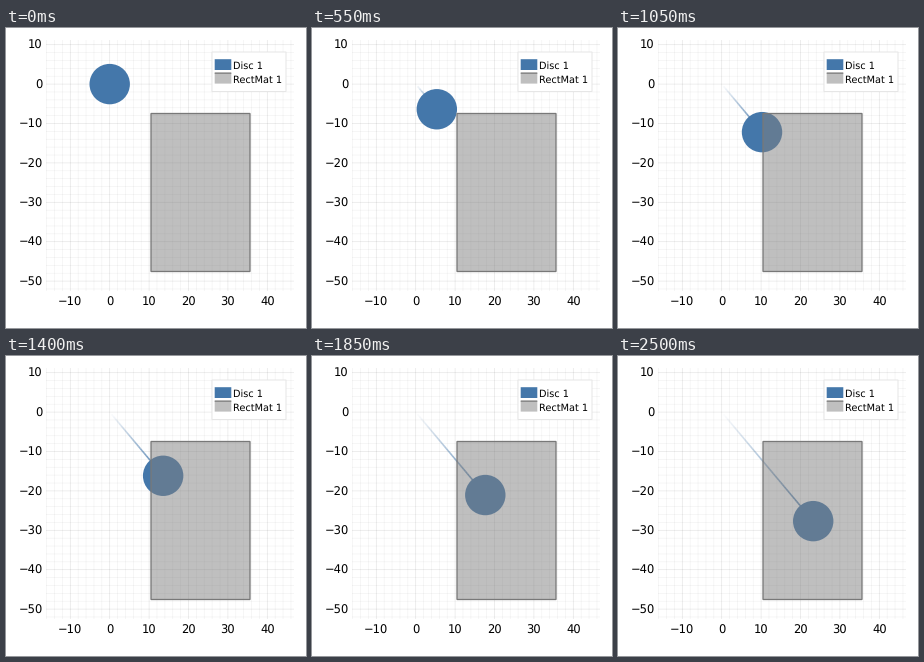
Animation of 300 by 300 pixels, one loop 2550 ms. Source, as a matplotlib script:

```python
import math

import matplotlib.pyplot as plt
import numpy as np
from matplotlib.animation import FuncAnimation
from matplotlib.collections import LineCollection
from matplotlib.colors import to_rgb
from matplotlib.patches import Circle, Rectangle

SIZE, FRAMES, STEP_MS = 300, 51, 50
BLUE, EDGE = "#4477AA", "#787878"
UNIT = 3.94                      # pixels per data unit
X0, Y0 = 103.7, 56.1             # pixel position of the data origin
LEFT, RIGHT, TOP, BOTTOM = 40, 288, 12, 263
SLOPE = math.tan(math.radians(50))

plt.rcParams["font.family"] = "DejaVu Sans"
plt.rcParams["text.hinting"] = "none"
fig = plt.figure(figsize=(SIZE / 72, SIZE / 72), dpi=72, facecolor="white")
ax = fig.add_axes([0, 0, 1, 1])
ax.set(xlim=(0, SIZE), ylim=(SIZE, 0))
ax.axis("off")


def px(x):
    return X0 + UNIT * x


def py(y):
    return Y0 - UNIT * y


def line(xs, ys, **style):
    ax.plot(xs, ys, snap=False, solid_capstyle="butt", **style)


def box(x, y, w, h, **style):
    ax.add_patch(Rectangle((x, y), w, h, snap=False, **style))


def grid_style(v):
    return dict(color="black", lw=0.67, alpha=0.1 if v % 10 == 0 else 0.05,
                zorder=0)


def draw_grid():
    for v in range(-16, 47, 2):
        if LEFT <= px(v) <= RIGHT:
            line([px(v)] * 2, [TOP, BOTTOM], **grid_style(v))
    for v in range(-52, 12, 2):
        if TOP <= py(v) <= BOTTOM:
            line([LEFT, RIGHT], [py(v)] * 2, **grid_style(v))


def draw_ticks():
    def label(x, y, v, align):
        ax.text(x, y, str(v).replace("-", "\u2212"), size=11.5, ha=align,
                va="baseline")

    for v in range(-10, 41, 10):
        label(px(v), 277.6, v, "center")
    for v in range(-50, 11, 10):
        label(36.8, py(v) + 4.5, v, "right")


def draw_legend():
    box(206, 24, 74, 39.5, fc="white", ec="#e6e6e6", lw=1, zorder=5)
    box(208.7, 31.2, 16.6, 10.8, fc=BLUE, ec="none", zorder=6)
    box(208.7, 45, 16.6, 10.6, fc="#bfbfbf", ec="none", zorder=6)
    line([208.7, 225.3], [45.1, 45.1], color=EDGE, lw=1.3, zorder=7)
    for y, label in ((41.2, "Disc 1"), (54.4, "RectMat 1")):
        ax.text(226.7, y, label, size=9.8, va="baseline", zorder=7)


def shift(n):
    """Horizontal travel in pixels: steady, then slowed by the material."""
    return 1.92 * n - 0.005 * np.maximum(n - 20, 0) ** 2


draw_grid()
draw_ticks()
draw_legend()
box(145, 85.5, 99, 158, fc=(0.5, 0.5, 0.5, 0.5), ec=EDGE, lw=1.3, zorder=3)
trail = LineCollection([], zorder=1, capstyle="butt", linewidths=1.6)
ax.add_collection(trail, autolim=False)
disc = Circle((X0, Y0), 20.2, fc=BLUE, ec="none", zorder=2)
ax.add_patch(disc)


def update(n):
    dx = shift(np.arange(n + 1))
    pts = np.column_stack([X0 + dx, Y0 + SLOPE * dx])
    disc.center = tuple(pts[-1])
    trail.set_segments(np.stack([pts[:-1], pts[1:]], axis=1))
    trail.set_color([(*to_rgb(BLUE), a) for a in np.linspace(0, 1, n)])
    return trail, disc


anim = FuncAnimation(fig, update, frames=FRAMES, interval=STEP_MS, repeat=True,
                     repeat_delay=0, blit=False)
plt.show()
```
